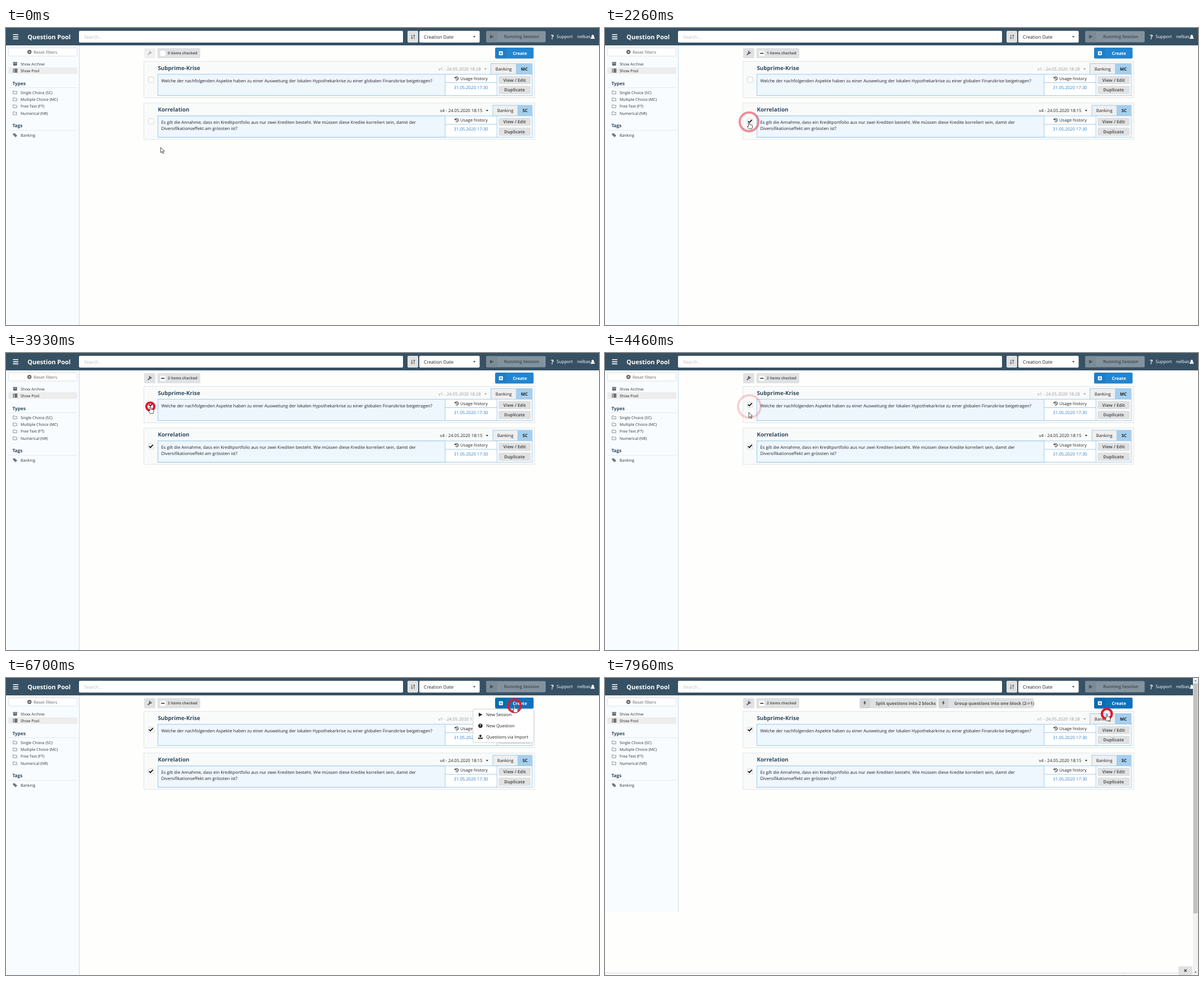
An HTML page that plays this animation: 1056 px wide and 530 px high, repeating every 8000 ms.

```html
<!DOCTYPE html>
<html lang="en">
<head>
<meta charset="utf-8">
<title>Question Pool</title>
<style>
  html, body { margin: 0; width: 100%; height: 100%; overflow: hidden; background: #fefefd; }
  svg { display: block; width: 1056px; height: 530px; }
  text { font-family: "Open Sans", "Noto Sans", sans-serif; text-rendering: geometricPrecision; white-space: pre; }
</style>
</head>
<body>
<svg id="stage" viewBox="0 0 1056 530"></svg>
<script>
const LOOP = 8000;
const NAV = '#375164', INK = '#222', GREY = '#5a5a5a', BUTTON = '#e0e1e2', LINE = '#9fcbec', TITLE = '#2f4a5e';

// Drawing helpers: boxes by their corners, text by its left end and middle line
const box = (x1, y1, x2, y2, fill, stroke = 'none', r = 0, extra = '') =>
  `<rect x="${x1}" y="${y1}" width="${x2 - x1}" height="${y2 - y1}" rx="${r}" fill="${fill}" stroke="${stroke}" ${extra}/>`;
const text = (x, y, str, fill = INK, size = 7.7, bold = false, anchor = 'start', id = '') =>
  `<text x="${x}" y="${y + size * .37}" fill="${fill}" font-size="${size}" font-weight="${bold ? 700 : 400}" text-anchor="${anchor}" id="${id}">${str}</text>`;
const stroke = (d, color, width = 1, extra = '') =>
  `<path d="${d}" fill="none" stroke="${color}" stroke-width="${width}" ${extra}/>`;
const shape = (d, fill, x = 0, y = 0) => `<path d="${d}" fill="${fill}" transform="translate(${x} ${y})"/>`;
const group = (id, body, extra = '') => `<g id="${id}" ${extra}>${body}</g>`;
const caret = (x, y, fill) => shape('M-2.2-1.1H2.2L0 1.4Z', fill, x, y);
const button = (x1, y1, x2, y2, label) =>
  box(x1, y1, x2, y2, BUTTON, 'none', 2) + text((x1 + x2) / 2, (y1 + y2) / 2, label, GREY, 7.7, true, 'middle');
const tick = (id, y) => stroke(`M254.8 ${y}L257.2 ${y + 2.3}L261.6 ${y - 2.6}`, '#111', 1.8, `id="${id}"`);
const play = (x, y, fill) => shape('M-3-3.6L3.6 0L-3 3.6Z', fill, x, y);
const bolt = (x, y) => shape('M-1-3.5H1.7L.8-1H2.5L-1.2 3.8L-.3.4H-2Z', GREY, x, y);

function navbar() {
  return box(0, 0, 1056, 31, NAV)
    + stroke('M12.5 11.8H22M12.5 15.6H22M12.5 19.4H22', '#fff', 1.6)
    + text(38.3, 15.5, 'Question Pool', '#fff', 11, true)
    + box(130, 5, 707, 26, '#fff', 'none', 2)
    + text(139, 15.5, 'Search...', '#bfbfbf', 8.25)
    + box(715, 5, 734, 26, BUTTON, 'none', 2)
    + stroke('M722.8 12V19M726.8 12.5V19.5', GREY, 1)
    + shape('M721 17.5H724.6L722.8 20ZM725 14H728.6L726.8 11.5Z', GREY)
    + box(736, 5, 843.5, 26, '#fff', 'none', 2)
    + text(744, 15.5, 'Creation Date', INK, 8.25) + caret(834, 15.7, '#333')
    + box(855, 5.5, 961, 25.5, '#83929d', 'none', 2)
    + box(855, 5.5, 875, 25.5, '#7c8b95', 'none', 2)
    + play(865, 15.5, '#475560')
    + text(887, 15.5, 'Running Session', '#475560', 7.7, true)
    + text(970.3, 15.5, '?', '#fff', 11, true)
    + text(980.5, 15.5, 'Support', '#fff') + text(1017, 15.5, 'nelbas', '#fff')
    + shape('M-3.5 3.6V2Q-3.5.6-1.6.5A2.3 2.3 0 1 1 1.6.5Q3.5.6 3.5 2V3.6Z', '#fff', 1044.8, 15.7);
}

function sidebar() {
  const folder = (label, i) => {
    const y = 115 + i * 12.4;
    return stroke(`M12.7 ${y + 2.6}V${y - 2.7}H15.5L16.3 ${y - 1.7}H19.3V${y + 2.6}Z`, '#777', .8)
      + text(26, y, label, '#333', 6.93);
  };
  return box(0, 31, 130, 530, '#f8fcff')
    + stroke('M130.5 31V530', '#c8d9e8')
    + box(4.5, 35.5, 126.5, 50, '#fff', '#dfe2e5', 2)
    + '<circle cx="41.7" cy="42.8" r="3.7" fill="#666"/>'
    + stroke('M40.3 41.4L43.1 44.2M43.1 41.4L40.3 44.2', '#fff', 1)
    + text(49, 42.8, 'Reset filters', '#666')
    + box(4, 70, 127, 82, '#ededed')
    + shape('M12.5 60.8H20V62.5H12.5ZM13 63H19.5V67H13Z', GREY) + stroke('M15 64.2H17.5', '#fff', .7)
    + text(26, 64, 'Show Archive', '#333', 6.93)
    + stroke('M12.5 73.5H14M12.5 76H14M12.5 78.5H14M15 73.5H20.3M15 76H20.3M15 78.5H20.3', '#222', 1.3)
    + text(26, 76.2, 'Show Pool', '#222', 6.93)
    + text(11.5, 98.5, 'Types', TITLE, 8.25, true) + stroke('M4 106.5H127', '#e6eaed')
    + ['Single Choice (SC)', 'Multiple Choice (MC)', 'Free Text (FT)', 'Numerical (NR)'].map(folder).join('')
    + text(11.5, 174.3, 'Tags', TITLE, 8.25, true) + stroke('M4 182.5H127', '#e6eaed')
    + shape('M12.5 188H15.8L20 192L17 195L12.5 190.8Z', '#777')
    + text(26, 191, 'Banking', '#333', 6.93);
}

function toolbar() {
  return group('wrench', box(246, 36, 266, 54, BUTTON, 'none', 2)
      + stroke('M253.2 47.6L257 43.8', GREY, 1.9, 'stroke-linecap="round"')
      + stroke('M259.2 43.2A1.9 1.9 0 1 1 257.4 41.4', GREY, 1.5))
    + box(269.5, 36, 346, 54, BUTTON, 'none', 2)
    + box(274.5, 40.5, 284, 50, '#fff', 'none', 1.5)
    + stroke('M276.3 45.2H282.3', '#222', 1.5, 'id="partial"')
    + text(288, 45, '0 items checked', GREY, 6.6, true, 'start', 'counter')
    + box(871, 35, 939.5, 54.5, '#2185d0', 'none', 2, 'id="create"')
    + box(871, 35, 891, 54.5, '#000', 'none', 2, 'opacity=".05"')
    + box(877.8, 41.5, 884.8, 48.5, '#fff', 'none', 1)
    + stroke('M879.3 45H883.3M881.3 43V47', '#2185d0', 1.2)
    + text(902.4, 45, 'Create', '#fff', 7.7, true);
}

function card(dy, title, version, muted, versionX, tagX, typeX, type, lines, tickId) {
  const tone = muted ? '#999' : INK;
  return `<g transform="translate(0 ${dy})">`
    + box(245.5, 59.5, 941.5, 124.5, '#f9fafa', '#e3e5e6')
    + text(270.4, 71.2, title, TITLE, 9.9, true)
    + box(253.5, 87.5, 263, 97, '#fff', '#d4d4d5', 1.5) + tick(tickId, 92)
    + text(versionX, 72.7, version, tone) + caret(versionX + 84, 73, tone)
    + box(tagX, 63.5, typeX, 82.5, '#efefef', LINE)
    + box(typeX, 63.5, 937, 82.5, '#a5cfee', LINE)
    + text((tagX + typeX) / 2, 72.8, 'Banking', INK, 7.7, false, 'middle')
    + text((typeX + 937) / 2, 72.8, type, INK, 7.7, true, 'middle')
    + box(270.5, 82.5, 937, 120.5, '#fff', LINE)
    + box(270.5, 82.5, 782, 120.5, '#eef6fe', LINE)
    + stroke('M782 97.5H874M874.3 82.5V120.5', LINE)
    + lines.map((line, i) => text(276.5, 93.9 + i * 11.3, line)).join('')
    + stroke('M800.3 88.3A3 3 0 1 1 800.6 92.2M802.7 88.4V90.3L804 91.2', INK, 1)
    + shape('M799 86.7V89.8H802Z', INK)
    + text(809, 90, 'Usage history')
    + text(828, 105.7, '31.05.2020 17:30', '#2a7fc9', 7.7, false, 'middle')
    + button(877, 85.5, 934.5, 100.3, 'View / Edit')
    + button(877, 103, 934.5, 118, 'Duplicate')
    + '</g>';
}

function menu() {
  return box(831.5, 57, 939.5, 116, '#000', 'none', 2, 'opacity=".07"')
    + box(831.5, 55.5, 939.5, 115, '#fff', '#d4d4d5', 2)
    + box(832, 56, 939, 75, '#f2f2f2', 'none', 0, 'id="menuHover"')
    + play(844.8, 65.4, INK)
    + '<circle cx="844.8" cy="85.2" r="3.8" fill="#222"/>'
    + text(844.8, 85.2, '?', '#fff', 6, true, 'middle')
    + shape('M0-4L3-.8H1V1.8H-1V-.8H-3ZM-4 1.5H-2V2.5H2V1.5H4V4H-4Z', INK, 844.8, 104.8)
    + ['New Session', 'New Question', 'Questions via Import']
      .map((label, i) => text(855, 65.4 + i * 19.7, label)).join('');
}

function sessionEditor() {
  const action = (x1, x2, labelX, label) => box(x1, 36, x2, 54, BUTTON, 'none', 2)
    + box(x1, 36, x1 + 18.5, 54, '#000', 'none', 2, 'opacity=".05"')
    + bolt(x1 + 9, 45) + text(labelX, 45, label, GREY, 7.7, true);
  return box(0, 418, 132, 530, '#fefefd')
    + action(453.5, 591, 482, 'Split questions into 2 blocks')
    + action(593.5, 763.5, 621.7, 'Group questions into one block (2-&gt;1)')
    + group('panel', box(0, 526, 1047, 620, '#fff') + stroke('M0 526.5H1047M925.5 526V620', '#d4d6d8')
      + box(1021, 514.5, 1046, 530, BUTTON) + stroke('M1031.5 520L1035.7 524.2M1035.7 520L1031.5 524.2', '#444', 1.4))
    + box(1047, 0, 1056, 530, '#f1f1f1') + box(1047.7, 9.5, 1055.3, 420, '#c1c1c1')
    + shape('M1049.5 6H1053.5L1051.5 3.5ZM1049.5 524H1053.5L1051.5 526.5Z', '#666');
}

const arrow = '<path id="arrow" d="M0 0V9.4L2.2 7.4L3.9 11L5.4 10.3L3.8 6.8H6.8Z" fill="#fff" stroke="#222" stroke-width=".8"/>';
const hand = '<path id="hand" d="M-1 1Q0-.4 1 1V5Q2 4.2 2.8 5.2Q3.8 4.6 4.4 5.7Q6 5.2 6 7V9.5L5 12.5H-.3L-3 8.7Q-3.4 6.8-1 8Z" fill="#fff" stroke="#222" stroke-width=".8"/>';

document.getElementById('stage').innerHTML = box(0, 0, 1056, 530, '#fefefd')
  + sidebar() + navbar() + toolbar()
  + card(0, 'Subprime-Krise', 'v1 - 24.05.2020 18:28', true, 770, 863.5, 909, 'MC',
    ['Welche der nachfolgenden Aspekte haben zu einer Ausweitung der lokalen Hypothekarkrise zu einer globalen Finanzkrise beigetragen?'], 'tickTop')
  + card(74.4, 'Korrelation', 'v4 - 24.05.2020 18:15', false, 772.8, 867, 911.5, 'SC',
    ['Es gilt die Annahme, dass ein Kreditportfolio aus nur zwei Krediten besteht. Wie müssen diese Kredite korreliert sein, damit der',
      'Diversifikationseffekt am grössten ist?'], 'tickBottom')
  + group('menu', menu()) + group('editor', sessionEditor())
  + '<circle id="ring" fill="none" stroke="#e0182d"/>'
  + group('cursor', arrow + hand);

// Pointer path: time, x, y
const path = [
  [0, 275.5, 213], [530, 275.5, 213], [1230, 256.5, 167.5], [2420, 256.5, 167.5], [2960, 253.5, 105.5],
  [3400, 257, 95.5], [4250, 257, 95.5], [4460, 256, 106], [4830, 331, 74], [5150, 590, 36],
  [5500, 866, 50.5], [5650, 892, 55], [5960, 905.5, 49.3], [7130, 905.5, 49.3], [7430, 893.7, 64], [LOOP, 893.7, 64]
];
const clicks = [[1500, 256.5, 167.5], [3560, 257, 95.5], [6160, 905.5, 49.3], [7520, 893.7, 64]];
const handSpans = [[1130, 2500], [3180, 4330], [5540, LOOP]];

// Monotone cubic: passes every point smoothly and rests where neighbours are equal
function along(axis, t) {
  const slope = i => (path[i + 1][axis] - path[i][axis]) / (path[i + 1][0] - path[i][0]);
  const tangent = i => {
    if (i === 0 || i === path.length - 1) return 0;
    const a = slope(i - 1), b = slope(i);
    return a * b <= 0 ? 0 : 2 * a * b / (a + b);
  };
  let i = 0;
  while (i < path.length - 2 && t >= path[i + 1][0]) i++;
  const span = path[i + 1][0] - path[i][0], u = (t - path[i][0]) / span, v = 1 - u;
  return path[i][axis] * v * v * (1 + 2 * u) + path[i + 1][axis] * u * u * (3 - 2 * u)
    + span * u * v * (tangent(i) * v - tangent(i + 1) * u);
}

const $ = id => document.getElementById(id);
const show = (id, on) => $(id).style.display = on ? '' : 'none';

function render(t) {
  const checked = (t >= 1600) + (t >= 3660);
  show('tickBottom', checked > 0);
  show('tickTop', checked > 1);
  show('partial', checked > 0);
  $('wrench').setAttribute('opacity', checked ? 1 : .45);
  $('counter').textContent = `${checked} items checked`;

  $('create').setAttribute('fill', t >= 6200 ? '#0d71bb' : t >= 5640 ? '#1678c2' : '#2185d0');
  show('menu', t >= 6260 && t < 7830);
  show('menuHover', t >= 7260);
  show('editor', t >= 7830);
  $('panel').setAttribute('transform', `translate(0 ${Math.max(0, (7950 - t) / 8)})`);

  const click = clicks.find(([start]) => t >= start && t < start + 1000);
  show('ring', click);
  if (click) {
    const age = (t - click[0]) / 1000, outer = 24.5 * age, width = Math.min(4, outer);
    const attributes = { cx: click[1], cy: click[2], r: outer - width / 2, 'stroke-width': width, opacity: Math.min(1, 2 * (1 - age)) };
    for (const name in attributes) $('ring').setAttribute(name, attributes[name]);
  }

  const pointing = handSpans.some(([from, to]) => t >= from && t < to);
  show('hand', pointing);
  show('arrow', !pointing);
  $('cursor').setAttribute('transform', `translate(${along(1, t)} ${along(2, t)})`);
}

const start = performance.now();
function loop() {
  render((performance.now() - start) % LOOP);
  requestAnimationFrame(loop);
}
loop();
</script>
</body>
</html>
```
